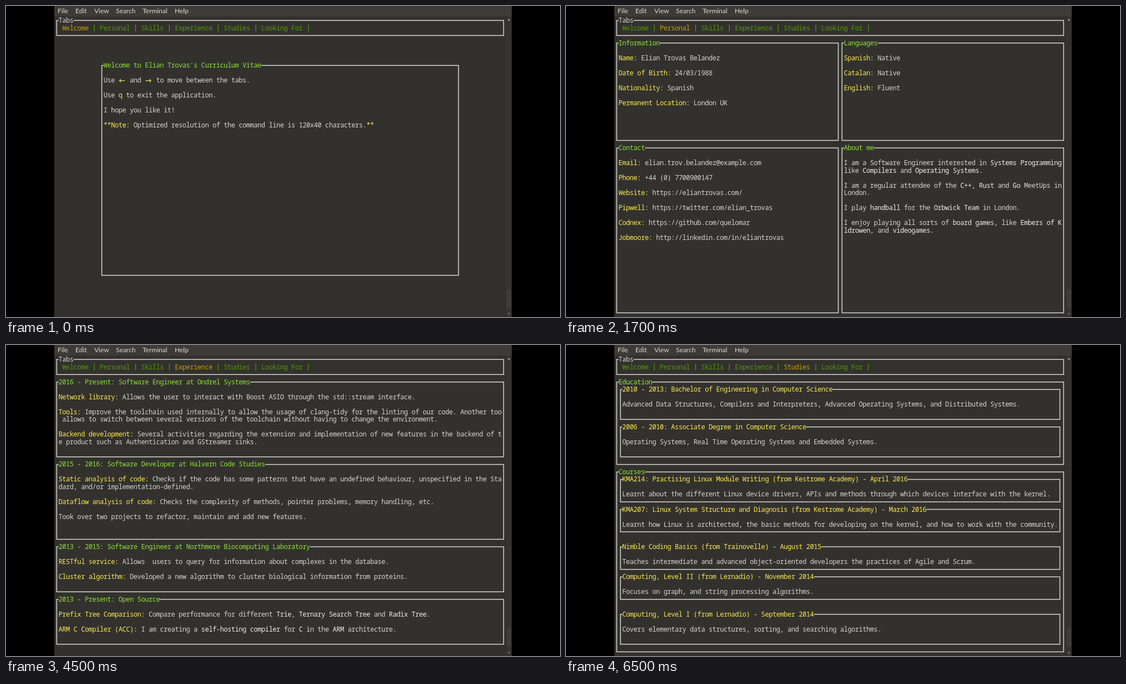
Animation of 998 by 561 pixels, one loop 8000 ms. Source, as an HTML page with a canvas:

```html
<!DOCTYPE html>
<html lang="en">
<head>
<meta charset="utf-8">
<title>Curriculum Vitae</title>
<style>
html, body { margin: 0; width: 100%; height: 100%; overflow: hidden; background: #000; }
canvas { display: block; width: 998px; height: 561px; }
</style>
</head>
<body>
<canvas id="stage"></canvas>
<script>
const W = 998, H = 561;
const LEFT = 88, CELL = 6.765, TOP = 26.1, ROW = 13.52;
const FONT = '12px "Noto Sans Mono", "DejaVu Sans Mono", monospace';
const ARROWS = '14px "DejaVu Sans", sans-serif';
const C = {
  bg: '#33312e', bar: '#3c3b37', fg: '#d3d7cf', white: '#eeeeec',
  green: '#4e9a06', gold: '#c4a000', lime: '#8ae234', yellow: '#fce94f',
  purple: '#75507b', dark: '#2e3436'
};
const TABS = ['Welcome', 'Personal', 'Skills', 'Experience', 'Studies', 'Looking For'];
const STARTS = [0, 500, 2500, 4500, 6500];
const LOOP = 8000;

const canvas = document.getElementById('stage');
const ctx = canvas.getContext('2d');
const dpr = window.devicePixelRatio || 1;
canvas.width = W * dpr;
canvas.height = H * dpr;
ctx.scale(dpr, dpr);

const x = col => LEFT + col * CELL;
const mid = col => x(col + 0.5);
const y = row => TOP + row * ROW;

function rect(l, t, w, h, color) {
  ctx.fillStyle = color;
  ctx.fillRect(l, t, w, h);
}

// One glyph per terminal cell
function text(col, row, str, color = C.fg) {
  ctx.fillStyle = color;
  ctx.textAlign = 'center';
  for (const ch of str) {
    if (ch === '←' || ch === '→') {
      ctx.font = ARROWS;
      ctx.fillText(ch, x(col + 0.9), y(row) + 4.6);
    } else if (ch !== ' ') {
      ctx.font = FONT;
      ctx.fillText(ch, mid(col), y(row) + 4);
    }
    col++;
  }
}

// ~yellow~ and ^white^ spans
function rich(col, row, str) {
  let color = C.fg;
  for (const part of str.split(/([~^])/)) {
    if (part === '~' || part === '^') {
      color = color !== C.fg ? C.fg : part === '~' ? C.yellow : C.white;
    } else {
      text(col, row, part, color);
      col += part.length;
    }
  }
}

function lines(col, rows) {
  for (const row in rows) rich(col, +row, rows[row]);
}

function box(c0, r0, c1, r1, title = '', color = C.lime) {
  ctx.strokeStyle = C.fg;
  ctx.lineWidth = 1.5;
  ctx.beginPath();
  ctx.moveTo(x(c0 + 1), y(r0));
  ctx.lineTo(mid(c0), y(r0));
  ctx.lineTo(mid(c0), y(r1));
  ctx.lineTo(mid(c1), y(r1));
  ctx.lineTo(mid(c1), y(r0));
  ctx.lineTo(x(c0 + 1 + title.length), y(r0));
  ctx.stroke();
  text(c0 + 1, r0, title, color);
}

function triangle(cx, cy, dir, color) {
  ctx.fillStyle = color;
  ctx.beginPath();
  ctx.moveTo(cx - 2.5, cy + dir);
  ctx.lineTo(cx + 2.5, cy + dir);
  ctx.lineTo(cx, cy - 1.5 * dir);
  ctx.fill();
}

function chrome(active) {
  rect(0, 0, W, H, '#000');
  rect(87, 0, 824, H, C.bg);
  rect(87, 0, 824, 19, C.bar);
  ctx.font = '12px Lato, "Open Sans", sans-serif';
  ctx.textAlign = 'left';
  ctx.fillStyle = '#dfdbd2';
  const menu = { File: 93, Edit: 125, View: 159, Search: 198, Terminal: 246, Help: 304 };
  for (const name in menu) ctx.fillText(name, menu[name], 13.3);

  rect(901, 19, 10, H - 19, '#363431');
  rect(902, 511, 8, 33, '#3f3d39');
  triangle(906, 25, 1, '#c8c5bd');
  triangle(906, 555, -1, '#85827b');

  box(0, 0, 119, 2, 'Tabs', C.fg);
  let col = 2;
  TABS.forEach((tab, i) => {
    text(col, 1, tab, i === active ? C.gold : C.green);
    col += tab.length + 1;
    rect(mid(col) - 0.6, y(1) - 6.3, 1.2, 12.6, C.green);
    col += 2;
  });
}

function welcome() {
  box(12, 6, 107, 34, "Welcome to Elian Trovas's Curriculum Vitae");
  lines(13, {
    8: 'Use ~←~  and ~→~  to move between the tabs.',
    10: 'Use ~q~ to exit the application.',
    12: 'I hope you like it!',
    14: '~**Note:~ Optimized resolution of the command line is 120x40 characters.~**~'
  });
}

function personal() {
  box(0, 3, 59, 16, 'Information');
  lines(1, {
    5: '~Name:~ Elian Trovas Belandez',
    7: '~Date of Birth:~ 24/03/1988',
    9: '~Nationality:~ Spanish',
    11: '~Permanent Location:~ London UK'
  });
  box(60, 3, 119, 16, 'Languages');
  lines(61, {
    5: '~Spanish:~ Native',
    7: '~Catalan:~ Native',
    9: '~English:~ Fluent'
  });
  box(0, 17, 59, 39, 'Contact');
  lines(1, {
    19: '~Email:~ elian.trov.belandez@example.com',
    21: '~Phone:~ +44 (0) 7700900147',
    23: '~Website:~ https://eliantrovas.com/',
    25: '~Pipwell:~ https://twitter.com/elian_trovas',
    27: '~Codnex:~ https://github.com/quelomar',
    29: '~Jobmoore:~ http://linkedin.com/in/eliantrovas'
  });
  box(60, 17, 119, 39, 'About me');
  lines(61, {
    19: 'I am a Software Engineer interested in ^Systems Programming^',
    20: 'like ^Compilers^ and ^Operating Systems.^',
    22: 'I am a regular attendee of the ^C++^, ^Rust^ and ^Go^ MeetUps in',
    23: 'London.',
    25: 'I play ^handball^ for the ^Orbwick Team^ in London.',
    27: 'I enjoy playing all sorts of ^board games^, like ^Embers of K^',
    28: '^ldrowen^, and ^videogames.^'
  });
}

function gauge(row, name, value) {
  const filled = Math.floor(118 * value / 100);
  const top = y(row + 1) - ROW / 2;
  text(1, row, name + ':', C.yellow);
  rect(x(1), top, 117 * CELL, ROW, C.dark);
  rect(x(1), top, filled * CELL, ROW, C.purple);
  [...(value + ' / 100')].forEach((ch, i) =>
    text(56 + i, row + 1, ch, 56 + i <= filled ? C.dark : C.purple));
}

function skills() {
  box(0, 3, 119, 24, 'Programming Languages');
  [['C++ (11/14/17)', 90], ['C', 80], ['Python', 80], ['Bash', 75], ['Go', 60], ['Rust', 50]]
    .forEach(([name, value], i) => gauge(4 + 2 * i, name, value));
  box(0, 25, 119, 39, 'Others');
  [
    [1, 15, 'Build Systems', 'Make,CMake,Gradle,Waf,Scons,Maven'],
    [18, 41, 'Continuous Integration', 'Gitlab CI,Travis,Jenkins'],
    [44, 68, 'Static/Dynamic Analysis', 'Clang-sanitizer,Flawmere,Perf,Valgrind'],
    [71, 85, 'Unit Test', 'Google Test,Google Mock,Unity,FFF'],
    [88, 103, 'Tools', 'Cling,Clang-tidy,Clang-format,Ctags,Cscope,Mozilla rr']
  ].forEach(([c0, c1, title, items]) => {
    box(c0, 26, c1, 38, title, C.yellow);
    items.split(',').forEach((item, i) => text(c0 + 2, 27 + i, item));
  });
}

function experience() {
  box(0, 3, 119, 13, '2016 - Present: Software Engineer at Ondrel Systems');
  box(0, 14, 119, 24, '2015 - 2016: Software Developer at Halvern Code Studies');
  box(0, 25, 119, 31, '2013 - 2015: Software Engineer at Northmere Biocomputing Laboratory');
  box(0, 32, 119, 38, '2013 - Present: Open Source');
  lines(1, {
    5: '~Network library:~ Allows the user to interact with Boost ASIO through the std::stream interface.',
    7: '~Tools:~ Improve the toolchain used internally to allow the usage of clang-tidy for the linting of our code. Another too',
    8: ' allows to switch between several versions of the toolchain without having to change the environment.',
    10: '~Backend development:~ Several activities regarding the extension and implementation of new features in the backend of t',
    11: 'e product such as Authentication and GStreamer sinks.',
    16: '~Static analysis of code:~ Checks if the code has some patterns that have an undefined behaviour, unspecified in the Sta',
    17: 'dard, and/or implementation-defined.',
    19: '~Dataflow analysis of code:~ Checks the complexity of methods, pointer problems, memory handling, etc.',
    21: 'Took over two projects to refactor, maintain and add new features.',
    27: '~RESTful service:~ Allows  users to query for information about complexes in the database.',
    29: '~Cluster algorithm:~ Developed a new algorithm to cluster biological information from proteins.',
    34: '~Prefix Tree Comparison:~ Compare performance for different ^Trie^, ^Ternary Search Tree^ and ^Radix Tree.^',
    36: '~ARM C Compiler (ACC):~ I am creating a ^self-hosting compiler^ for ^C^ in the ^ARM^ architecture.'
  });
}

function studies() {
  box(0, 3, 119, 14, 'Education');
  box(0, 15, 119, 39, 'Courses');
  [
    [4, 8, '2010 - 2013: Bachelor of Engineering in Computer Science',
      'Advanced Data Structures, Compilers and Interpreters, Advanced Operating Systems, and Distributed Systems.'],
    [9, 13, '2006 - 2010: Associate Degree in Computer Science',
      'Operating Systems, Real Time Operating Systems and Embedded Systems.'],
    [16, 19, 'KMA214: Practising Linux Module Writing (from Kestrome Academy) - April 2016',
      'Learnt about the different Linux device drivers, APIs and methods through which devices interface with the kernel.'],
    [20, 23, 'KMA207: Linux System Structure and Diagnosis (from Kestrome Academy) - March 2016',
      'Learnt how Linux is architected, the basic methods for developing on the kernel, and how to work with the community.'],
    [25, 28, 'Nimble Coding Basics (from Trainovelle) - August 2015',
      'Teaches intermediate and advanced object-oriented developers the practices of Agile and Scrum.'],
    [29, 32, 'Computing, Level II (from Lernadio) - November 2014',
      'Focuses on graph, and string processing algorithms.'],
    [34, 38, 'Computing, Level I (from Lernadio) - September 2014',
      'Covers elementary data structures, sorting, and searching algorithms.']
  ].forEach(([r0, r1, title, body]) => {
    box(1, r0, 118, r1, title, C.yellow);
    text(2, r0 + 2, body);
  });
}

const PAGES = [welcome, personal, skills, experience, studies];
let shown = -1;

function tick() {
  const t = performance.now() % LOOP;
  const page = STARTS.filter(s => s <= t).length - 1;
  if (page !== shown) {
    shown = page;
    chrome(page);
    PAGES[page]();
  }
  requestAnimationFrame(tick);
}
tick();
</script>
</body>
</html>
```
